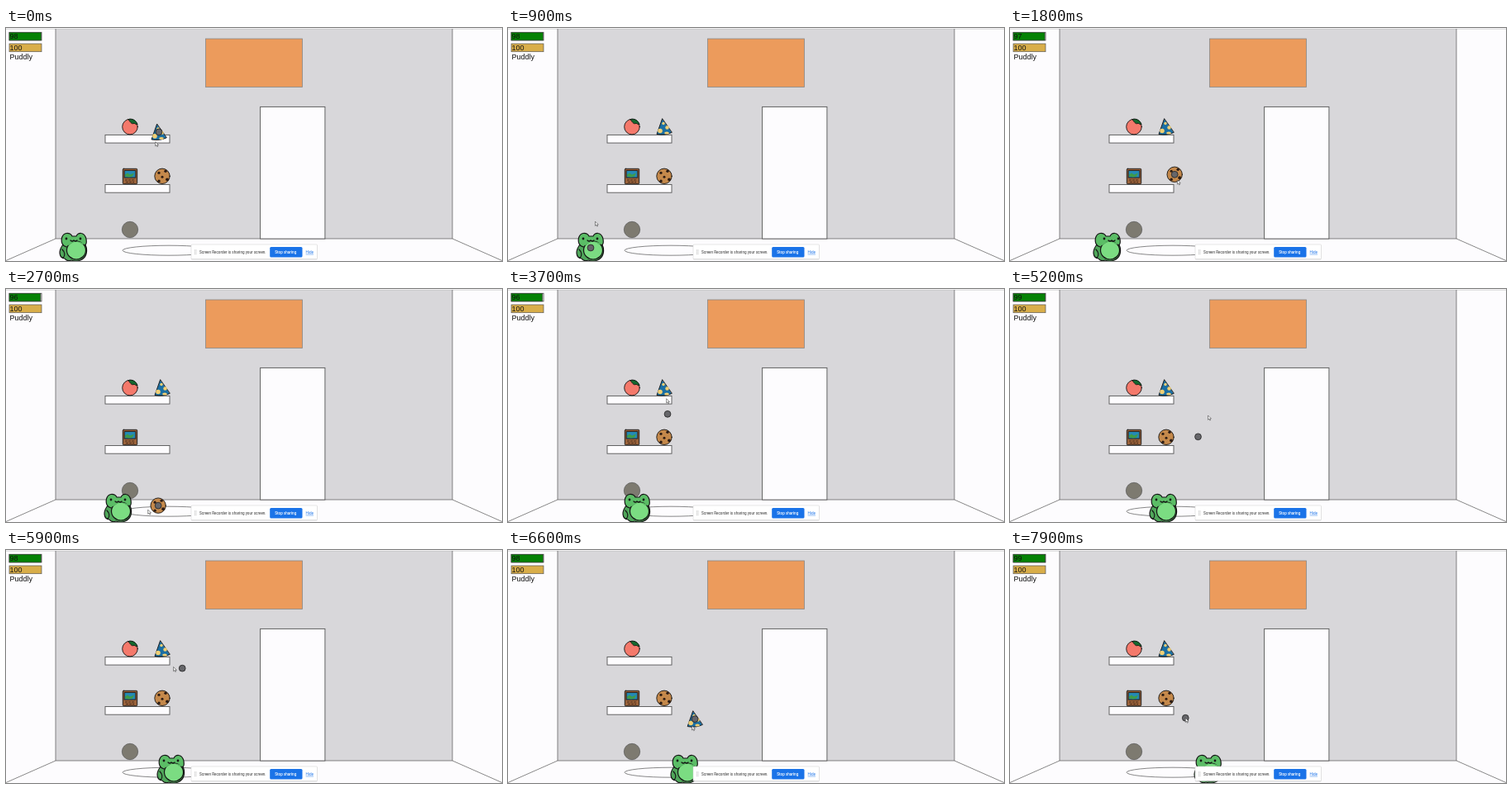
Write an HTML page that moves like this. It is 600 by 282 pixels and loops after 8000 ms.

```html
<!DOCTYPE html>
<html lang="en">
<head>
<meta charset="utf-8">
<title>Pet room</title>
<style>
html, body { margin: 0; width: 100%; height: 100%; overflow: hidden; background: #fdfcfe; }
svg { display: block; width: 600px; height: 282px; }
.hud { font: 9px "Liberation Sans", Arial, sans-serif; }
.bar { font: 4.6px Roboto, "Open Sans", sans-serif; }
.line { fill: none; stroke: #555; stroke-width: .7; }
.box { fill: #fdfcfe; stroke: #555; stroke-width: .9; }
.ink { stroke: #151515; stroke-width: .9; stroke-linejoin: round; stroke-linecap: round; }
#pet { stroke-width: 1.2; }
</style>
</head>
<body>
<svg viewBox="0 0 600 282">
  <!-- room -->
  <rect width="600" height="282" fill="#fdfcfe"/>
  <rect x="60" y="1" width="480" height="254" fill="#d8d7da"/>
  <path d="M0 1.2H600" stroke="#bbb" stroke-width=".6"/>
  <path class="line" d="M60 1V255H540V1M60 255L0 281.5M540 255L600 281.5"/>
  <rect x="241.5" y="13" width="117" height="58.5" fill="#ec9b5c" stroke="#888" stroke-width=".8"/>
  <rect class="box" x="307.6" y="95.4" width="78.3" height="159.7"/>
  <rect class="box" x="120" y="129.4" width="78" height="9.7"/>
  <rect class="box" x="120" y="189.5" width="78" height="9.7"/>
  <ellipse class="line" cx="197" cy="269.2" rx="56" ry="6"/>

  <!-- status -->
  <rect class="box" x="4" y="5.3" width="39" height="9.6"/>
  <rect id="life" x="4" y="5.3" height="9.6" fill="#058205" stroke="#333" stroke-width=".6"/>
  <rect x="4" y="19" width="39" height="9.7" fill="#d9ae4a" stroke="#555" stroke-width=".7"/>
  <g class="hud" fill="#111">
    <text id="count" x="4.5" y="13"></text>
    <text x="4.5" y="26.8">100</text>
    <text x="4.5" y="37.5">Puddly</text>
  </g>

  <!-- toys -->
  <circle class="line" cx="150" cy="244" r="9.7" style="fill: #7d7a70"/>
  <g class="ink" transform="translate(150 119.6)">
    <circle r="9.3" fill="#f4796b"/>
    <path d="M-2-9C3-11 8-7 9-3C7-2 6-5 4-4C2-3 0-6-2-9Z" fill="#17682f"/>
  </g>
  <g transform="translate(150 179.5)">
    <rect class="ink" x="-8.7" y="-9.2" width="17.4" height="18.4" rx="1" fill="#9a623a"/>
    <rect x="-6.8" y="-7" width="13.6" height="8.6" fill="#2589b5" stroke="#222"/>
    <path d="M-6-2L-3-4L0-2L5-4L3 0L-1 1L-6 0Z" fill="#3e9b4a"/>
    <path d="M-6 4.5H6M-5 7H5" stroke="#4a2c1c" stroke-width="1.2" stroke-dasharray="3 1"/>
  </g>

  <!-- pet -->
  <g id="pet" class="ink">
    <path d="M-13-4C-19 4-18 12-11 13Q-8 17-3 15Q3 17 8 15C16 12 17 3 14-4Z" fill="#4fa65a"/>
    <path d="M-14-5C-16-10-14-17-9-17.5Q-4-18-2-14H3Q5-18 9-17.5C14-17 16-10 15-5Q12 0 0 0T-14-5Z" fill="#5bbd66"/>
    <ellipse cx="3" cy="3" rx="11.5" ry="11" fill="#7bdc82"/>
    <path d="M-13-5Q0-11 14-5L10-4Q3-11-6-3Z" fill="#5bbd66" stroke="none"/>
    <path d="M-14 2C-11 5-10 9-13 12" fill="none"/>
    <g id="face">
      <circle cx="-9" cy="-11" r=".8" fill="#151515"/>
      <circle cx="8" cy="-11" r=".8" fill="#151515"/>
      <path d="M-4-9Q-2-7 0-9Q2-7 4-9" fill="none"/>
    </g>
  </g>

  <!-- movable items -->
  <g id="hat" class="ink">
    <path d="M-2.5-9.5L-9 9Q1 11 9 7Z" fill="#1b6fa3"/>
    <g fill="#f0cf74" stroke="none">
      <circle cx="-1" cy="-4" r="1.7"/><circle cx="3.5" cy="1" r="2.2"/>
      <circle cx="-5" cy="5" r="2.8"/><ellipse cx="3" cy="7.5" rx="2.8" ry="1.5"/>
    </g>
  </g>
  <g id="cookie">
    <circle class="ink" r="9.2" fill="#c5894b"/>
    <g fill="#2c1c14">
      <circle cx="-4" cy="-4" r="1.6"/><circle cx="4" cy="-6" r="1.7"/>
      <circle cx="0" cy="1" r="1.5"/><circle cx="-4" cy="6" r="1.7"/>
      <circle cx="6" cy="4" r="1.9"/>
    </g>
  </g>
  <circle id="dot" r="3.9" fill="#66666a" stroke="#222" stroke-width=".8"/>

  <!-- sharing bar -->
  <g class="bar">
    <rect x="224" y="262.4" width="152.5" height="18" rx="1" fill="#999" opacity=".3"/>
    <rect x="224" y="262" width="152.5" height="17.6" rx="1" fill="#fff" stroke="#ccc" stroke-width=".5"/>
    <path d="M228.3 268.6V274M230 268.6V274" stroke="#888" stroke-width=".8" stroke-dasharray=".8 1.3"/>
    <text x="234" y="272.8" fill="#333">Screen Recorder is sharing your screen.</text>
    <rect x="319.2" y="265" width="39.3" height="12.5" rx="1.5" fill="#1a73e8"/>
    <text x="325.3" y="272.9" fill="#fff" font-weight="500">Stop sharing</text>
    <text x="362.6" y="272.8" fill="#1a73e8" text-decoration="underline">Hide</text>
  </g>
  <path id="arrow" d="M0 0V5.2L1.3 4.1L2.2 6L3 5.6L2.2 3.8H3.8Z" fill="#fff" stroke="#222" stroke-width=".5"/>
</svg>
<script>
const LOOP = 8000, STEP = 100, LAG = 110;
const $ = id => document.getElementById(id);
const shelf = { hat: [189, 119.5], cookie: [189, 179.3] };
const pet = t => [82 + t / 50, 266];

// Each trip carries an item to the pet (out), then heads for the next item (back).
// out and back hold the two control points of a cubic curve.
const trips = [
  { item: "hat", grab: -100, drop: 900, gain: 0, out: [[175, 133], [170, 230]], back: [[100, 200], [160, 180]] },
  { item: "cookie", grab: 1500, drop: 3000, gain: 0, out: [[205, 145], [235, 288]], back: [[190, 240], [200, 160]] },
  { item: "hat", grab: 3900, drop: 5000, gain: 4, out: [[283, 129], [202, 297]], back: [[308, 30], [207, 200]] },
  { item: "hat", grab: 6200, drop: 7000, gain: 2, out: [[262, 242], [204, 175]], back: [[235, 240], [242, 230]] },
  { item: "cookie", grab: 8100 }
];

function cubic(a, [b, c], d, u) {
  const v = 1 - u;
  return [0, 1].map(i =>
    v ** 3 * a[i] + 3 * v * v * u * b[i] + 3 * v * u * u * c[i] + u ** 3 * d[i]);
}

function pointer(t) {
  const i = trips.findLastIndex(trip => trip.grab <= t);
  const { item, grab, drop, out, back } = trips[i], next = trips[i + 1];
  return t < drop
    ? cubic(shelf[item], out, pet(drop), (t - grab) / (drop - grab))
    : cubic(pet(drop), back, shelf[next.item], (t - drop) / (next.grab - drop));
}

function place(id, [x, y]) {
  $(id).setAttribute("transform", `translate(${x} ${y})`);
}

function draw(t) {
  const pos = pointer(t);
  place("dot", pos);
  place("arrow", pointer(Math.min(t + LAG, LOOP - STEP)));

  const held = trips.find(trip => t >= trip.grab && t < trip.drop)?.item;
  for (const id in shelf) place(id, id === held ? pos : shelf[id]);

  place("pet", pet(t));
  const turned = t % 700 >= 400 && t % 700 < 600;
  place("face", [turned ? 5 : 0, 0]);

  const life = trips.reduce((sum, { drop, gain }) => t >= drop ? sum + gain : sum, 98.9 - t / 1400);
  $("life").setAttribute("width", 39 * life / 100);
  $("count").textContent = Math.floor(life);
}

function tick(now) {
  draw(Math.floor(now % LOOP / STEP) * STEP);
  requestAnimationFrame(tick);
}
draw(0);
requestAnimationFrame(tick);
</script>
</body>
</html>
```
